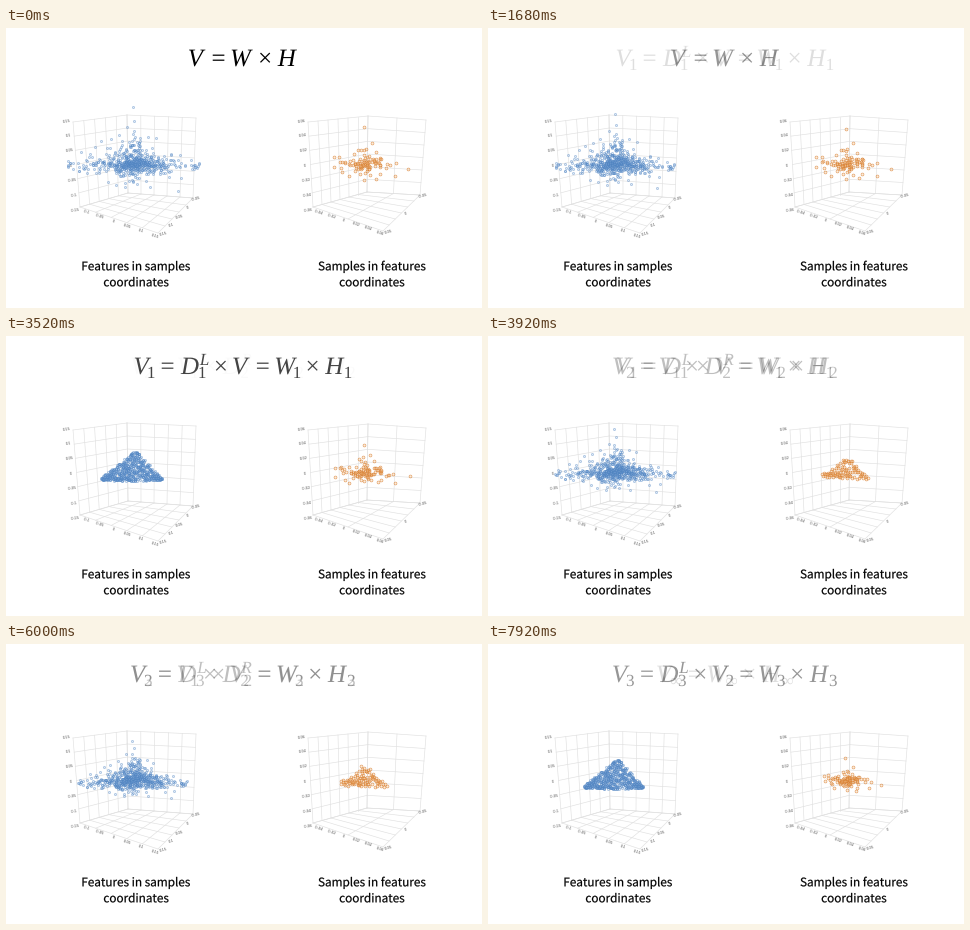
Write a matplotlib script that moves like this. It is 476x280 px and loops after 8 s.

```python
import numpy as np
import matplotlib.pyplot as plt
from matplotlib.animation import FuncAnimation
from matplotlib.patches import PathPatch
from matplotlib.path import Path
from matplotlib.textpath import TextPath
from matplotlib.transforms import Affine2D

W, H, DPI = 476, 280, 100
STEP, FRAMES = 80, 100
PT = 72 / DPI
rng = np.random.default_rng(5)

fig = plt.figure(figsize=(W / DPI, H / DPI), dpi=DPI, facecolor="white")
ax = fig.add_axes([0, 0, 1, 1])
ax.set_xlim(0, W)
ax.set_ylim(H, 0)
ax.axis("off")


# ---- text as outlines, placed by its inked edges ----
def glyphs(s, px, family, style="normal"):
    path = TextPath((0, 0), s, size=px, prop={"family": family, "style": style})
    return path.transformed(Affine2D().scale(1, -1))


def ink(path):
    box = path.get_extents()
    return box.x0, box.x1


def move(path, dx, dy):
    return path.transformed(Affine2D().translate(dx, dy))


def caption(cx, *lines):
    for row, s in enumerate(lines):
        path = glyphs(s, 11.75, "Noto Sans CJK JP")
        path = move(path, cx - sum(ink(path)) / 2, 242.3 + 16 * row)
        ax.add_patch(PathPatch(path, fc="black", ec="black", lw=0.15))


caption(130.2, "Features in samples", "coordinates")
caption(366, "Samples in features", "coordinates")


def equation(source, gap=7.3, centre=237, base=38):
    """Lay out tokens such as D_1^L with even gaps between their ink."""
    parts, x = [], 0

    def put(s, px, left, dy):
        style = "italic" if s.isalpha() else "normal"
        path = glyphs(s, px, "Liberation Serif", style)
        path = move(path, left - ink(path)[0], base + dy)
        parts.append(path)
        return ink(path)[1]

    for token in source.split():
        head, _, sup = token.partition("^")
        letter, _, sub = head.partition("_")
        edge = right = put(letter, 25, x, 0)
        tuck = 3.5 if letter in "VW" else 0
        if sub:
            right = put(sub, 17, edge + 0.8 - tuck, 4)
        if sup:
            right = max(right, put(sup, 17, edge + 1, -9))
        x = right + gap
    path = Path.make_compound_path(*parts)
    path = move(path, centre - sum(ink(path)) / 2, 0)
    return ax.add_patch(PathPatch(path, fc="black", lw=0))


equations = [equation(s) for s in (
    "V = W × H",
    "V_1 = D_1^L × V = W_1 × H_1",
    "V_2 = V_1 × D_2^R = W_2 × H_2",
    "V_3 = D_3^L × V_2 = W_3 × H_3",
    "V_∞ = W_∞ × H_∞")]
EQ_START, EQ_PERIOD, EQ_FADE = 1280, 2080, 1120


# ---- axes boxes ----
def wall(a, b, c, d, cols, rows):
    """Grid on the quad a-b-c-d; cols along a-b, rows along a-d."""
    a, b, c, d = map(np.array, (a, b, c, d))
    t = np.linspace(0, 1, cols + 1)[:, None]
    s = np.linspace(0, 1, rows + 1)[:, None]
    pairs = [*zip(a + (b - a) * t, d + (c - d) * t),
             *zip(a + (d - a) * s, b + (c - b) * s)]
    for p, q in pairs:
        ax.plot([p[0], q[0]], [p[1], q[1]], color="#e0e0e0", lw=0.45, zorder=1)


def ticks(start, end, values, angle):
    places = np.linspace(start, end, len(values))
    for (x, y), v in zip(places, values):
        ax.text(x, y, f"{v:.2g}", fontsize=3.6 * PT, family="DejaVu Sans",
                color="#555555", ha="center", va="center", rotation=angle)


def box(left, back, right, front, foot, drop, nx, ny, step, far):
    """left, back and right are top corners; foot holds the ones below."""
    lb, bb, rb = foot
    wall(left, back, bb, lb, nx, 6)
    wall(back, right, rb, bb, ny, 6)
    wall(lb, bb, rb, front, nx, ny)
    scale = np.arange(-3, 4) * step
    lx, ly = lb
    ticks((left[0] - 6, left[1] - 1), (lx - 5, ly + 3), scale[::-1], 8)
    ticks((lx + 6, ly + 5), (front[0] - 3, front[1] + drop), scale[1:], -18)
    ticks((front[0] + 5, front[1] + 1), (rb[0] + 3, rb[1] + 1), far, 15)


box((67, 94), (121, 87), (190, 90), (152, 205),
    ((74, 179), (122, 165), (187, 170)), 3, 5, 5, 0.05,
    np.arange(3, -2, -1) * 0.05)
box((302, 94), (362, 88), (420, 92), (377, 203),
    ((307, 179), (361, 164), (414, 167)), 2, 6, 2, 0.02, [0.05, 0, -0.05])


# ---- point clouds ----
def cloud(n, spread, limit, rise):
    """Heavy-tailed cross, softly limited, with an extra upward arm."""
    off = rng.standard_t(2.2, (n, 2)) * spread
    off = limit * np.tanh(off / limit)
    arm = n // 13
    heights = -np.log((np.arange(arm) + 0.5) / arm)
    off[:arm, 0] = rng.normal(0, 0.3 * spread[0], arm)
    off[:arm, 1] = -rise * heights / heights[0]
    return off


def rank(v):
    return (np.argsort(np.argsort(v)) + 0.5) / len(v)


def simplex(pts, left, apex, right):
    """Squeeze points into a triangle, keeping their order in x and y."""
    c = 2 * rank(pts[:, 0]) - 1
    v = rank(-pts[:, 1] + rng.normal(0, 2, len(pts)))
    x = (left[0] + right[0]) / 2 + (right[0] - left[0]) / 2 * (
        0.65 * c + 0.35 * c ** 3)
    corners = [left[0], apex[0], right[0]]
    base = np.interp(x, corners, [left[1], left[1] + 1, right[1]])
    roof = np.interp(x, corners, [left[1] - 3, apex[1], right[1] - 3])
    return np.c_[x, base + (roof - base) * v ** 1.2]


def jitter(pts, amount):
    return pts + rng.normal(0, amount, pts.shape)


mid = np.array([127.5, 136])
off = cloud(660, np.array([15, 4.2]), np.array([66, 30]), 57)
blue_a = mid + off
blue_simplex = simplex(blue_a, (96, 144), (130, 114), (155, 144))
blue_path = [blue_a, (1280, 2400, blue_simplex),
             (3360, 4240, jitter(mid + off * [1, 0.87], 0.8)),
             (5440, 6720, blue_simplex)]

mid = np.array([360, 137])
off = cloud(100, np.array([10.5, 4.2]), np.array([48, 18]), 38)
orange_a = mid + off
orange_path = [orange_a, (1280, 2400, jitter(mid + off * [1, 0.75], 1.5)),
               (3360, 4080, simplex(orange_a, (334, 141), (360, 121), (379, 143))),
               (5600, 6720, jitter(mid + off * [0.75, 0.6], 1.2))]


def dots(px, edge, face):
    return ax.scatter([], [], s=(px * PT) ** 2, linewidths=0.4,
                      edgecolors=edge, facecolors=face, zorder=3)


blue = dots(2.1, "#4a80c0a0", "#8fb4e040")
orange = dots(2.9, "#d87c2cd0", "#f6c89450")


def progress(t, start, end):
    return min(max((t - start) / (end - start), 0), 1)


def ease(p):
    return 4 * p ** 3 if p < 0.5 else 1 - 4 * (1 - p) ** 3


def follow(path, t):
    pos = path[0]
    for start, end, target in path[1:]:
        pos = pos + (target - pos) * ease(progress(t, start, end))
    return pos


def draw(i):
    t = i * STEP
    blue.set_offsets(follow(blue_path, t))
    orange.set_offsets(follow(orange_path, t))
    for k, eq in enumerate(equations):
        leave = EQ_START + k * EQ_PERIOD
        enter = leave - EQ_PERIOD
        shown = progress(t, enter, enter + EQ_FADE)
        gone = progress(t, leave, leave + EQ_FADE)
        eq.set_alpha(1 if k == 0 and gone == 0 else (shown * (1 - gone)) ** 2)
    return [blue, orange, *equations]


anim = FuncAnimation(fig, draw, frames=FRAMES, interval=STEP,
                     init_func=lambda: draw(0), repeat=True, repeat_delay=0)
plt.show()
```
